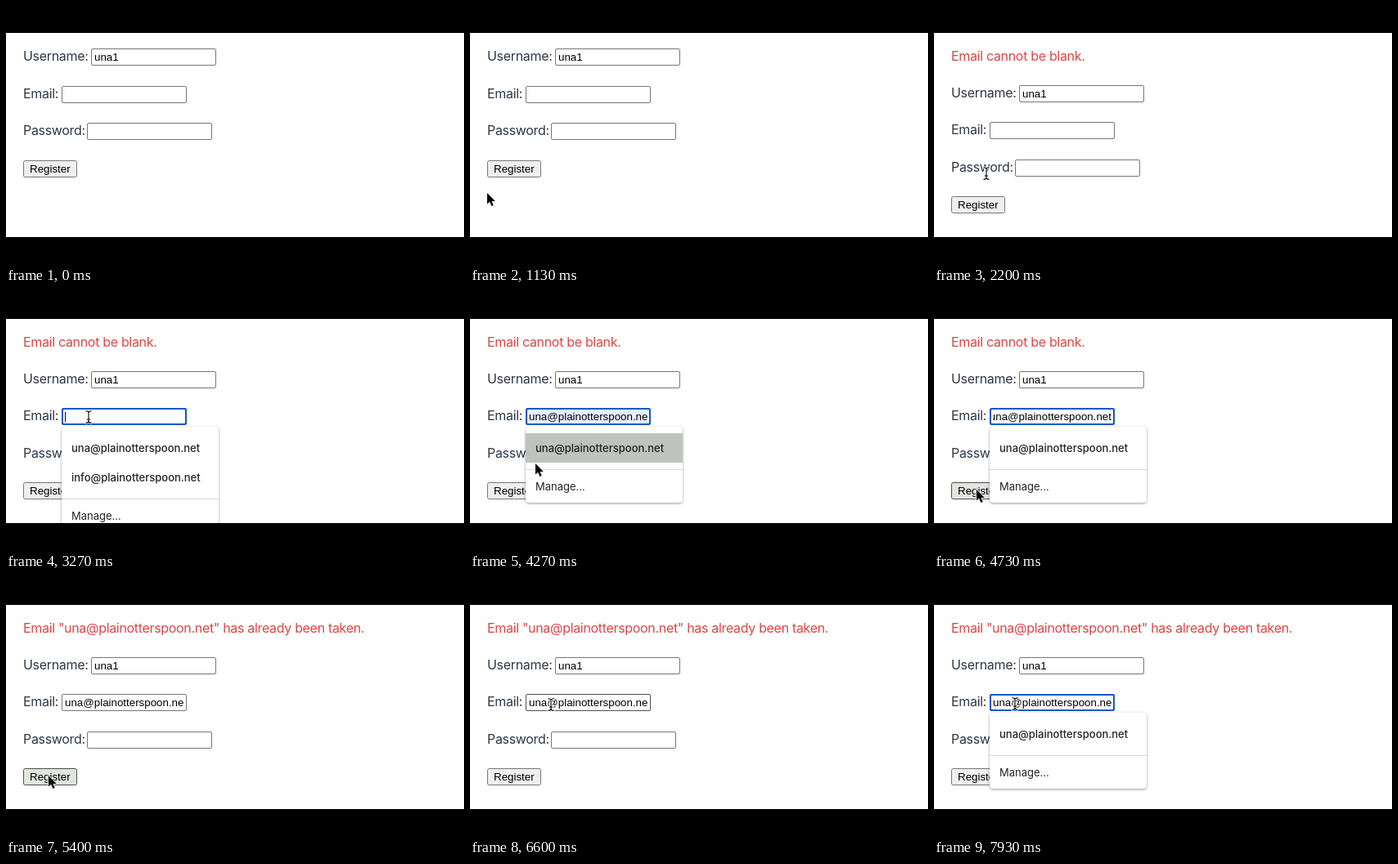
Recreate the animation shown at these times as an HTML page. Size 560 by 316 pixels, loop 8 s.

```html
<!DOCTYPE html>
<html lang="en">
<head>
<meta charset="utf-8">
<title>Registration form</title>
<style>
  html, body { margin: 0; width: 100%; height: 100%; overflow: hidden; background: #fff; }
  svg { display: block; width: 560px; height: 316px; }
  text { white-space: pre; }
  .label { font: 16px Inter, sans-serif; letter-spacing: -.32px; fill: #2d3748; }
  .error { fill: #dc4646; }
  .value { font: 13.333px "Liberation Sans", Arial, sans-serif; fill: #000; }
  .menu { font: 13px Inter, sans-serif; fill: #222; }
  .item { font-weight: 500; }
  .box { fill: #fff; stroke: #767676; }
  #button rect { fill: #efefef; stroke: #767676; }
  #button.hover rect { fill: #e0e5df; stroke: #4f4f4f; }
  #button.press rect { fill: #f5f5f5; stroke: #8d8d8d; }
  #email.hover .box { stroke: #4f4f4f; }
  #email.preview .box { fill: #e8f0fe; }
  #ring { fill: none; stroke: #1259c3; stroke-width: 2; }
  #panel { fill: #fff; filter: drop-shadow(0 1px 1.5px rgba(0, 0, 0, .4)); }
  #mark { fill: #c0c2c0; }
</style>
</head>
<body>
<svg viewBox="0 0 560 316">
  <defs>
    <clipPath id="inner"><rect x="72" y="2" width="145" height="17"/></clipPath>
  </defs>
  <rect width="560" height="316" fill="#fff"/>
  <text id="error" class="label error" x="21" y="67"></text>

  <g id="user">
    <text class="label" x="21" y="15">Username:</text>
    <rect class="box" x="104.5" y=".5" width="152" height="20" rx="1.5"/>
    <text class="value" x="108" y="15">una1</text>
  </g>
  <g id="email">
    <text class="label" x="21" y="15">Email:</text>
    <rect class="box" x="68.5" y=".5" width="152" height="20" rx="1.5"/>
    <g clip-path="url(#inner)"><text id="address" class="value" y="15">una@plainotterspoon.net</text></g>
    <rect id="caret" y="5" width="1" height="12"/>
    <rect id="ring" x="69" y="1" width="151" height="19" rx="2"/>
  </g>
  <g id="pass">
    <text class="label" x="21" y="15">Password:</text>
    <rect class="box" x="99.5" y=".5" width="152" height="20" rx="1.5"/>
  </g>
  <g id="button">
    <rect x="21.5" y=".5" width="65" height="20" rx="2"/>
    <text class="value" x="29" y="15">Register</text>
  </g>

  <g id="popup">
    <rect id="panel" x="68" y="165" width="192" rx="4"/>
    <rect id="mark" x="68" y="173" width="192" height="36"/>
    <text class="menu item" x="80" y="196">una@plainotterspoon.net</text>
    <text id="extra" class="menu item" x="80" y="232">info@plainotterspoon.net</text>
    <g id="foot">
      <rect x="68" y="217" width="192" height="1" fill="#d8d8d8"/>
      <text class="menu" x="80" y="243">Manage…</text>
    </g>
  </g>

  <path id="arrow" d="M0 0V13.6L3.1 10.8 5.4 16 7.7 15 5.5 10H9.8Z" stroke="#fff" stroke-width="1.6" stroke-linejoin="round" paint-order="stroke"/>
  <g id="beam" fill="none" stroke-linecap="round">
    <path id="stem" d="M-3.2-7.3Q0-7.3 0-5V5Q0 7.3-3.2 7.3M3.2-7.3Q0-7.3 0-5M0 5Q0 7.3 3.2 7.3M-1.8 3H1.8" stroke="#fff" stroke-width="2.4"/>
    <use href="#stem"/>
    <path d="M-3.2-7.3Q0-7.3 0-5V5Q0 7.3-3.2 7.3M3.2-7.3Q0-7.3 0-5M0 5Q0 7.3 3.2 7.3M-1.8 3H1.8" stroke="#000" stroke-width="1.1"/>
  </g>

  <rect width="560" height="33"/>
  <rect y="283" width="560" height="33"/>
</svg>
<script>
  const LOOP = 8000, FPS = 15;
  const el = Object.fromEntries([...document.querySelectorAll('[id]')].map(e => [e.id, e]));
  const show = (e, on) => { e.style.display = on ? '' : 'none'; };
  const move = (e, x, y) => e.setAttribute('transform', `translate(${x} ${y})`);
  const within = (s, a, b) => s >= a && s < b;

  // Pointer runs: first step, shape, then one point per step.
  const runs = [
    [0, 'none', [0, 0]],
    [11, 'arrow', [309, 57], [262, 112], [196, 176], [120, 212], [62, 229],
      [18, 235], [21, 229], [38, 218], [55, 209], [64, 205]],
    [33, 'beam', [64, 205]],
    [36, 'beam', [66, 201]],
    [37, 'arrow', [76, 184], [87, 165]],
    [39, 'beam', [95, 149], [100, 143], [101, 148], [101, 153]],
    [57, 'none', [0, 0]],
    [61, 'beam', [100, 157]],
    [62, 'arrow', [93, 180], [85, 198], [80, 210], [75, 222], [69, 231],
      [62, 237], [57, 240], [53, 242], [52, 242]],
    [88, 'arrow', [54, 245], [58, 240], [65, 228], [74, 208]],
    [92, 'beam', [83, 192]],
    [93, 'arrow', [91, 175]],
    [94, 'beam', [97, 162], [100, 157], [101, 155]],
    [99, 'beam', [99, 155]],
    [117, 'beam', [102, 153], [102, 153], [99, 154]]
  ];

  function pointer(s) {
    const [start, shape, ...points] = runs.findLast(r => r[0] <= s);
    const [x, y] = points[Math.min(s - start, points.length - 1)];
    return { shape, x, y };
  }

  function draw(s) {
    const failed = s >= 33, taken = s >= 81;
    const tops = failed ? [97, 142, 188, 233] : [52, 98, 143, 189];
    [el.user, el.email, el.pass, el.button].forEach((row, i) => move(row, 0, tops[i]));
    el.error.textContent = taken ? 'Email "una@plainotterspoon.net" has already been taken.'
      : failed ? 'Email cannot be blank.' : '';

    const p = pointer(s);
    for (const shape of ['arrow', 'beam']) {
      show(el[shape], p.shape === shape);
      move(el[shape], p.x, p.y);
    }

    // Email field
    const typing = within(s, 49, 72), again = s >= 103;
    const preview = within(s, 62, 65);
    const overField = p.shape === 'beam' && p.x >= 68 && within(p.y, tops[1], tops[1] + 21);
    el.email.setAttribute('class', preview ? 'preview' : overField ? 'hover' : '');
    show(el.ring, typing || again);
    show(el.address, s >= 58);
    const toEnd = within(s, 58, 72) && !preview;
    el.address.setAttribute('x', toEnd ? 217 : 72);
    el.address.setAttribute('text-anchor', toEnd ? 'end' : 'start');
    show(el.caret, within(s, 49, 57) || within(s, 58, 61) || within(s, 103, 113));
    el.caret.setAttribute('x', again ? 94 : s < 57 ? 72 : 217);

    // Suggestions
    const open = typing || s >= 105, long = s < 58;
    show(el.popup, open);
    show(el.mark, preview);
    show(el.extra, long);
    el.panel.setAttribute('height', long ? 129 : 93);
    move(el.foot, 0, long ? 36 : 0);

    // Button
    const pressed = within(s, 24, 27) || within(s, 72, 75);
    const overButton = p.shape === 'arrow' && within(p.x, 21, open ? 68 : 87)
      && within(p.y, tops[3], tops[3] + 21);
    el.button.setAttribute('class', pressed ? 'press' : overButton ? 'hover' : '');
  }

  function tick() {
    const t = performance.now() % LOOP;
    draw(Math.floor((t + 5) * FPS / 1000) % (LOOP * FPS / 1000));
    requestAnimationFrame(tick);
  }
  tick();
</script>
</body>
</html>
```
